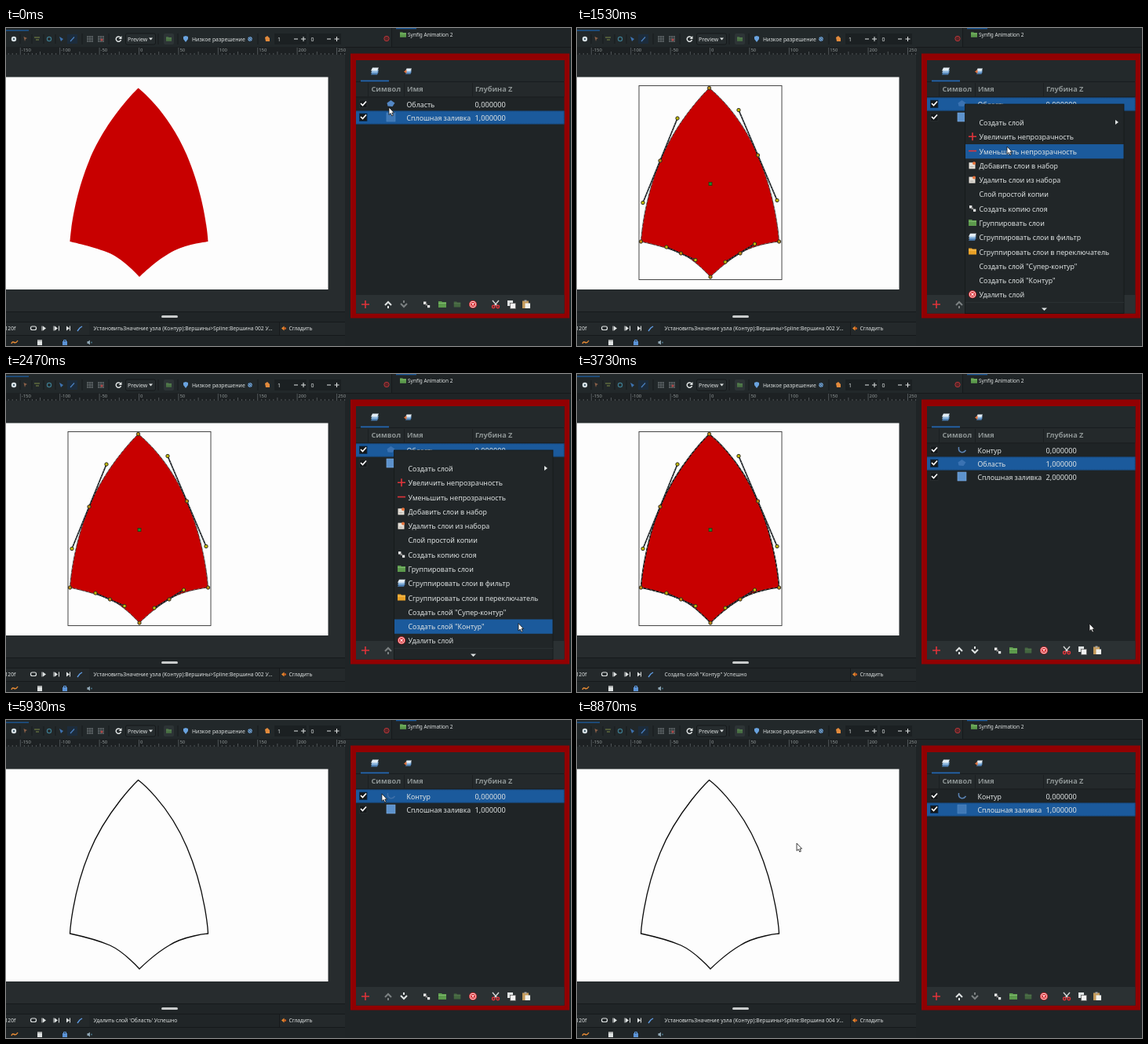
These frames come from a looping animation (720x405 px, 8990 ms). An HTML page:

```html
<!DOCTYPE html>
<html lang="ru">
<head>
<meta charset="utf-8">
<style>
html, body { margin: 0; height: 100%; overflow: hidden; background: #1f2426; }
svg { display: block; width: 720px; height: 405px; font-family: "Noto Sans", "Open Sans", sans-serif; }
</style>
</head>
<body>
<svg viewBox="0 0 720 405"><g id="base"></g><g id="live"></g></svg>
<script>
const LOOP = 8990;
const INK = '#dfe3e3', GREY = '#8d9494', BLUE = '#1b5a9c', SKY = '#5f9be0', RED = '#e0343a', GREEN = '#5c9a4c';
const LABEL = 8.8;

// Markup helpers
const text = (x, y, s, size = LABEL, fill = INK, more = '') =>
  `<text x="${x}" y="${y}" font-size="${size}" fill="${fill}" ${more}>${s}</text>`;
const rect = (x, y, w, h, fill, more = '') =>
  `<rect x="${x}" y="${y}" width="${w}" height="${h}" fill="${fill}" ${more}/>`;
const shape = (d, fill, more = '') => `<path d="${d}" fill="${fill}" ${more}/>`;
const line = (d, color = INK, w = 1.2, more = '') =>
  `<path d="${d}" fill="none" stroke="${color}" stroke-width="${w}" ${more}/>`;
const dot = (x, y, r, fill, more = '') => `<circle cx="${x}" cy="${y}" r="${r}" fill="${fill}" ${more}/>`;
const at = (x, y, s, more = '', scale = 1) =>
  `<g transform="translate(${x} ${y}) scale(${scale})" ${more}>${s}</g>`;

// Icons centred on 0,0
const icon = {
  plus: line('M-5 0H5M0-5V5', RED, 1.6),
  minus: line('M-5 0H5', RED, 1.6),
  up: line('M-4 1L0-3L4 1', INK, 2) + rect(-1, 2, 2, 3, INK),
  down: line('M-4-1L0 3L4-1', INK, 2) + rect(-1, -5, 2, 3, INK),
  copy: rect(-4, -3.5, 3.4, 3.4, '#eee') + rect(1, 1, 3.2, 3.2, '#eee') + rect(-1.5, -1, 2.5, 2.5, '#888'),
  folder: shape('M-5-4H-1L0-3H5V4H-5Z', GREEN) + line('M-5-1.5H5', '#8cc67a', .8),
  gold: shape('M-5-4H-1L0-3H5V4H-5Z', '#e8a026') + line('M-5-1.5H5', '#ffd071', .8),
  layers: [2.6, .2, -2.4].map((y, i) =>
    shape(`M-5 ${y + 2}L-3 ${y - 2}H5L3 ${y + 2}Z`, ['#4d7fb4', '#8db6dd', '#e3edf5'][i])).join(''),
  set: rect(-4.5, -3.5, 8, 8, '#e5e0d8') + dot(2, -2.5, 2, '#e8743c') + line('M-3 2H1.5', '#999', .8),
  remove: dot(0, 0, 5, '#d92a30') + dot(0, 0, 3.9, '#fff') + dot(0, 0, 3.2, '#d92a30') +
    line('M-1.6-1.6L1.6 1.6M1.6-1.6L-1.6 1.6', '#fff', 1.1),
  cut: line('M-4-5L2 2M4-5L-2 2', '#d5d8d8', 1.4) +
    [-2.8, 2.8].map(x => dot(x, 3, 1.7, 'none', `stroke="${RED}" stroke-width="1.5"`)).join(''),
  pages: rect(-5, -5, 7, 7, '#dfe3e3') + rect(-1.5, -1.5, 7, 7, '#f2f2f2', 'stroke="#555" stroke-width=".7"'),
  paste: rect(-5, -4.5, 8, 9.5, '#c49a5a') + rect(-2.5, -5.5, 3, 2, '#aaa') + rect(-1.5, -1.5, 6.5, 6.5, '#f0f0ec'),
  grid: line('M-4-3H4M-4 0H4M-4 3H4M-3-4V4M0-4V4M3-4V4', '#70777a', .8),
  Область: shape('M-5-1L0-4.5L5-1L2 3.5L-4 3Z', '#5487c4'),
  Контур: line('M-4-3.5C-5 4 2 5 5 .5', '#5b83b4', 1.5),
  'Сплошная заливка': rect(-5.5, -5.5, 11, 11, '#5d92cc', 'stroke="#7fb0e4" stroke-width=".6"')
};

function drawBase() {
  let s = rect(0, 0, 720, 405, '#1f2426') + rect(0, 0, 491, 24, '#22282a') +
    rect(0, 24, 432, 10, '#1d2123') + rect(0, 34, 432, 327, '#272c2e') +
    rect(0, 361, 432, 44, '#202527') + rect(0, 374, 432, 17, '#24292b') +
    line('M0 374.5H432M0 391.5H432M0 361.5H432M348.5 375V391M491.5 0V24M432 24.5H720', '#16191b', 1) +
    rect(0, 2.5, 29, 1.3, BLUE) + rect(497, 0, 26, 1.3, BLUE) +
    rect(198, 366, 21, 3, '#c9cccc', 'rx="1.5"') + rect(0, 62.5, 410.5, 270.5, '#fdfdfd');

  // Ruler
  for (let i = -33; i <= 52; i++) {
    const x = 169.5 + i * 5.04, big = i % 10 === 0;
    s += line(`M${x} ${big ? 25 : i % 5 ? 32 : 30}V34`, '#737a7c', .6);
    if (big) s += text(x + 1.5, 30, i * 5, 5.9, '#969d9d');
  }

  // Top toolbar
  s += dot(10, 14, 3.2, '#d9e2e6') + dot(10, 14, 1.2, '#4b6470') +
    shape('M22.5 11L27 13L25 14L24 17Z', '#8a6048') +
    line('M36 12H43M38 15H42', '#7d8c46', 1.1) + dot(55, 14, 2.6, 'none', 'stroke="#3d7b8e" stroke-width="1.2"') +
    shape('M68 11L73 14L70 17Z', '#3d72b0') + rect(78, 8, 13, 12, '#1c2c3c') + line('M82 17L87 11.5', '#4a80c0', 1.2) +
    line('M18 8V20M33 8V20M48 8V20M63 8V20M97 7V21M131 7V21M194 7V21M219 7V21M321 7V21', '#171b1d', 1) +
    at(107, 14, icon.grid) + at(121, 14, icon.grid) + dot(122, 15, 1.5, '#b04444') +
    line('M146 12.2A3.2 3.2 0 1 0 146.5 15', INK, 1.5) + shape('M147.5 10V14H143.5Z', INK) +
    rect(152.5, 7, 38, 14, '#262c2e', 'stroke="#15191a" rx="2"') + text(155, 16.5, 'Preview', 6.9) +
    shape('M182 12.5H187L184.5 15.5Z', INK) +
    rect(201, 7, 13, 14, '#2d3436', 'rx="2"') + at(207.5, 14, icon.folder, 'opacity=".6"', .7) +
    shape('M226 11L229 10L232 11V14L229 18L226 14Z', '#6aa3df') + text(237, 16.5, 'Низкое разрешение', 6.8) +
    dot(311, 14, 2.9, '#44719f') + line('M309 12L313 16M308.5 14.5L310.5 16.5M311.5 11.5L313.5 13.5', '#a5c0d8', .8) +
    shape('M330 12L333 10L336 13V17H331Z', '#e28a3c') +
    rect(342, 7, 41, 14, '#1b2022') + rect(386, 7, 41, 14, '#1b2022') +
    text(346, 16.5, '1', 7) + text(388.5, 16.5, '0', 7) +
    line('M367 14H372M376 14H382M379 11V17M409 14H414M418.5 14H424.5M421.5 11V17', INK, 1) +
    dot(485, 13.5, 3.2, '#5a2426', 'stroke="#b3363a" stroke-width="1"') +
    at(506, 8.5, icon.folder, '', .8) + text(512, 11, 'Synfig Animation 2', 6.5);

  // Status bar and bottom tabs
  s += text(-1.5, 385, '120f', 6.7) +
    rect(31.5, 380, 7, 4.5, 'none', `stroke="${INK}" stroke-width="1.2" rx="2"`) +
    [49, 64, 79].map(x => shape(`M${x - 2} 379.5L${x + 2} 382.5L${x - 2} 385.5Z`, INK) +
      line(x === 79 ? `M${x + 2.5} 379.5V385.5` : `M${x - 3} 379.5V385.5`, INK, 1)).join('') +
    line('M67.5 379.5V385.5', INK, 1) +
    line('M91 386L94 382L97 380', SKY, 1.4) + rect(106, 375, 242, 16, '#202527') +
    shape('M351 382.5L354.5 379.5V385.5Z', '#e88a2e') + dot(355.5, 382.5, 1.6, '#c65d20') +
    text(360.5, 385, 'Сгладить', 6.7) +
    line('M7 402C9 396 11 405 15 398', '#e58a34', 1.5) +
    rect(40, 397, 6, 7, '#dfe3e3') + line('M40 398H46', '#777', 1) +
    rect(72, 399, 6, 5, '#5b93d6') + line('M73.5 399V397.5H76.5V399', SKY, 1) +
    shape('M103.5 399H105L107 397.5V403.5L105 402H103.5Z', '#8fa6b4') + dot(109, 400.5, .9, '#4a7a90');

  // Framed layer panel
  s += rect(439, 32.5, 279, 337, '#920002') + rect(446, 41, 265.5, 322.5, '#1f2426') +
    rect(446, 41, 265.5, 27, '#23292b') + rect(446, 69, 265.5, 18.5, '#24292b') +
    line('M446 68.5H711M446 88H711', '#171b1d', .8) + line('M507.5 70V87M594.5 70V87M461.5 70V87', '#1a1e20', .8) +
    rect(452, 66.5, 36, 1.8, '#2567b0') + at(470, 55, icon.layers) +
    at(513, 55, icon.layers, '', .8) + shape('M507 55.5L510.5 53V58Z', '#e0713c') +
    [[465.5, 'Символ'], [511, 'Имя'], [598, 'Глубина Z']].map(([x, s]) =>
      text(x, 81, s, 9.2, GREY, 'font-weight="600"')).join('') +
    rect(446, 340, 265.5, 23.5, '#2b3133') + at(458, 352, icon.plus) + at(536, 352, icon.copy) +
    at(556, 352, icon.folder) + at(575, 352, icon.folder, 'opacity=".5"', .85) + at(595, 352, icon.remove) +
    at(624, 352, icon.cut) + at(644, 352, icon.pages) + at(663, 352, icon.paste);
  return s;
}

// Cursor stops: time, x, y
const STOPS = [[0, 488, 101], [220, 490, 96], [600, 494, 97], [900, 497, 104], [1530, 548, 151], [1750, 556, 162],
  [2470, 653, 317.5], [4070, 653, 318], [4700, 595, 350], [5050, 595, 350], [5870, 479, 94], [6130, 478.5, 93.5],
  [6780, 231, 162], [6900, 231, 162], [7330, 257.5, 153], [7470, 264, 152], [7670, 264, 152], [8070, 280, 157], [LOOP, 280, 157]];

function cursorAt(t) {
  const i = STOPS.findIndex(s => s[0] > t), [t0, x0, y0] = STOPS[i - 1], [t1, x1, y1] = STOPS[i];
  const u = (t - t0) / (t1 - t0), e = u * u * (3 - 2 * u);
  return [x0 + (x1 - x0) * e, y0 + (y1 - y0) * e];
}

const MENU = [['', 'Создать слой'], ['plus', 'Увеличить непрозрачность'], ['minus', 'Уменьшить непрозрачность'],
  ['set', 'Добавить слои в набор'], ['set', 'Удалить слои из набора'], ['', 'Слой простой копии'],
  ['copy', 'Создать копию слоя'], ['folder', 'Группировать слои'], ['layers', 'Сгруппировать слои в фильтр'],
  ['gold', 'Сгруппировать слои в переключатель'], ['', 'Создать слой "Супер-контур"'],
  ['', 'Создать слой "Контур"'], ['remove', 'Удалить слой']];

function drawMenu(y) {
  const hover = Math.round((y - 120.5) / 18.27);
  return rect(494.5, 97, 202.5, 266.5, '#212628', 'stroke="#15191a" stroke-width=".8"') +
    MENU.map(([name, label], i) => {
      const mid = 120.5 + i * 18.27;
      return (i === hover ? rect(495, mid - 9, 201.5, 18.3, BLUE) : '') +
        (name ? at(504, mid - .5, icon[name]) : '') + text(512.5, mid + 3.6, label);
    }).join('') +
    shape('M686 117V123L690 120Z', INK) + line('M495 349.5H697', '#2d3335', .8) + shape('M592 356.5H599L595.5 360Z', INK);
}

function drawRow(name, i, selected) {
  const y = 97 + i * 17;
  return (selected ? rect(446, y - 8.5, 265.5, 17, BLUE) +
      line(`M446 ${y - 8}H711V${y + 8}H446`, '#10355c', .6, 'stroke-dasharray="1 1"') : '') +
    rect(450.5, y - 5, 9.5, 9.5, '#14181a', `stroke="${selected ? '#0b2a4a' : '#2b3032'}" stroke-width=".8"`) +
    line(`M452 ${y - 1}L454.5 ${y + 1.5}L459 ${y - 3.5}`, '#fff', 1.7) +
    at(490.5, y - .5, icon[name], selected ? 'opacity=".55"' : '') +
    text(510.5, y + 3.8, name) + text(597.5, y + 3.8, i + ',000000', 9.2);
}

// Shape vertices with their tangents; the side vertex is draggable
function drawShape(t, region, outline, handles) {
  const [x, y] = t > 6900 && t < 8400 ? cursorAt(Math.min(t, 7330)) : [230.5, 162];
  const knots = [[106, 169, 128, 115, 84, 222.5], [132.5, 287, 114, 279, 151, 295.5],
    [208, 287, 189, 298, 226.5, 275], [x, y, x - 24.5, y - 57.5, x + 24.5, y + 57.5]];
  const ends = [[168.5, 76.5], [81.5, 272], [170, 317], [257.5, 272]];
  const d = 'M168.5 76.5' + knots.map(([kx, ky, ax, ay, bx, by], i) => {
    const p = ends[i], q = ends[(i + 1) % 4];
    const [inn, out] = i === 3 ? [[bx, by], [ax, ay]] : [[ax, ay], [bx, by]];
    return `C${p} ${inn} ${kx} ${ky}C${out} ${q} ${q}`;
  }).join('') + 'Z';
  let s = region ? shape(d, '#c80000') : '';
  if (outline) s += line(d, '#0a0a0a', 1.3);
  if (!handles) return s;

  let right = 257.5;
  for (let u = 0; u < 1; u += .02) {
    const v = 1 - u;
    right = Math.max(right, 257.5 * (v ** 3 + 3 * v * v * u) + 3 * v * u * u * (x + 24.5) + u ** 3 * x);
  }
  const pad = region ? 3 : 4, edge = 'stroke="#222" stroke-width=".9"';
  s += line(d, '#222', .8) + line(d, '#9aa0a0', .7, 'stroke-dasharray="2.5 3"') +
    rect(82 - pad, 76.5 - pad, right - 81.5 + 2 * pad, 241 + 2 * pad, 'none', 'stroke="#333" stroke-width=".9"');
  for (const [, , ax, ay, bx, by] of knots) {
    const l = `M${ax} ${ay}L${bx} ${by}`;
    s += line(l, '#111518', 1.7) + line(l, '#7d8790', .7, 'stroke-dasharray="2 2"') +
      dot(ax, ay, 2.2, '#c2ba08', edge) + dot(bx, by, 2.2, '#c2ba08', edge);
  }
  for (const [kx, ky] of [...knots, ...ends]) s += dot(kx, ky, 2.2, region ? '#bd8c12' : '#dc6418', edge);
  return s + (region ? rect(168, 196.5, 4, 4, '#1c8a2c', 'stroke="#303010" stroke-width=".8"')
    : dot(170, 198.5, 2.2, '#109a2c', edge));
}

function draw(t) {
  const [x, y] = cursorAt(t);
  const layers = t < 2700 ? ['Область', 'Сплошная заливка']
    : t < 5000 ? ['Контур', 'Область', 'Сплошная заливка'] : ['Контур', 'Сплошная заливка'];
  const selected = t < 330 ? 1 : t < 2700 ? 0 : t < 5000 ? 1 : t < 5900 ? -1 : t < 8600 ? 0 : 1;
  const handles = t >= 330 && t < 5000 || t >= 6000 && t < 8600;
  const node = n => `УстановитьЗначение узла (Контур):Вершины&gt;Spline:Вершина 00${n} У...`;
  const status = t < 2700 ? node(2) : t < 5000 ? 'Создать слой "Контур" Успешно'
    : t < 7330 ? "Удалить слой 'Область' Успешно" : node(4);
  const dim = on => on ? '' : 'opacity=".45"';

  return drawShape(t, layers.includes('Область'), layers.includes('Контур'), handles) +
    text(111.5, 385, status, 6.7) +
    layers.map((name, i) => drawRow(name, i, i === selected)).join('') +
    at(487, 352, icon.up, dim(selected > 0)) +
    at(507, 352, icon.down, dim(selected >= 0 && selected < layers.length - 1)) +
    (t >= 650 && t < 2700 ? drawMenu(y) : '') +
    at(x, y, shape('M0 0V9.5L2.2 7.6L3.8 11L5.4 10.2L3.9 7H6.6Z', '#fff', 'stroke="#111" stroke-width=".8"'));
}

const live = document.getElementById('live');
document.getElementById('base').innerHTML = drawBase();
const start = performance.now();
function tick() {
  live.innerHTML = draw((performance.now() - start) % LOOP);
  requestAnimationFrame(tick);
}
tick();
</script>
</body>
</html>
```
